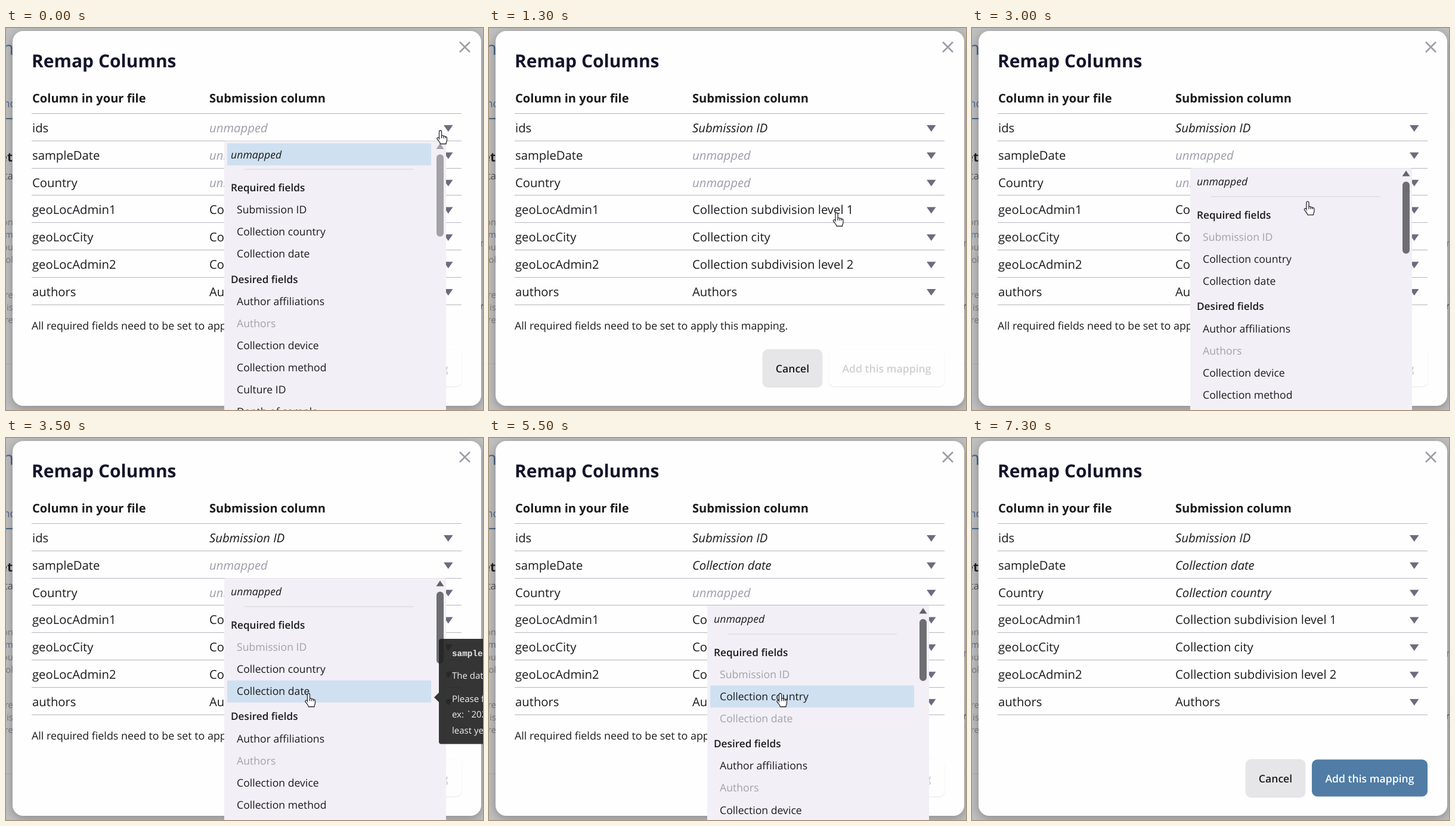
Animation, 800 px wide and 641 px high, one loop 7.4 s. Source, as an HTML page with a canvas:

```html
<!DOCTYPE html>
<html lang="en">
<head>
<meta charset="utf-8">
<title>Remap Columns</title>
<style>
  html, body { margin: 0; width: 100%; height: 100%; overflow: hidden; background: #c0c0c0; }
  canvas { display: block; }
</style>
</head>
<body>
<canvas id="stage" width="800" height="641"></canvas>
<script>
const ctx = document.getElementById('stage').getContext('2d');
ctx.textRendering = 'geometricPrecision';

const LOOP = 7400, STEP = 100, ROW = 45.83, ITEM = 37.1;
const SANS = '"Open Sans", "Noto Sans", sans-serif';
const INK = '#1b1b1e', MUTED = '#9d9dac', PANEL = '#f2f0f6', ACTIVE = '#cfe0f0';

const columns = [
  ['ids', 'Submission ID'],
  ['sampleDate', 'Collection date'],
  ['Country', 'Collection country'],
  ['geoLocAdmin1', 'Collection subdivision level 1'],
  ['geoLocCity', 'Collection city'],
  ['geoLocAdmin2', 'Collection subdivision level 2'],
  ['authors', 'Authors'],
];

// The first three columns are mapped by hand: menu opens, tooltip shows, entry is picked.
const choices = [
  { open: 0, tip: 600, pick: 1100, help: ['submissionId', ['Your sequence identifier']] },
  { open: 2200, tip: 3400, pick: 3800, help: ['sampleCollectionDate', ['The date of collection'],
      ['Please follow the format,', 'ex: `2024-05-01`, with at', 'least year given']] },
  { open: 4500, tip: 5700, pick: 5900, help: ['geoLocCountry', ['The country of collection']] },
];

const menu = [
  ['Required fields', 'Submission ID', 'Collection country', 'Collection date'],
  ['Desired fields', 'Author affiliations', 'Authors', 'Collection device',
    'Collection method', 'Culture ID', 'Depth of sample'],
];

// Pointer stops: time, x, y
const pointer = [
  [0, 720.5, 171.5], [200, 720, 173], [600, 578, 308], [1300, 575, 309.5], [1900, 585, 216],
  [2800, 585, 216], [3300, 499.5, 428], [3800, 499.5, 428], [4400, 476, 261],
  [5000, 476, 261], [5500, 480.5, 428], [6100, 480.5, 428], [6500, 500, 450],
];
const hand = new Path2D('M6 14V2.5a2 2 0 0 1 4 0V9.5a2 2 0 0 1 3.3 .7a2 2 0 0 1 3 .9' +
  'a1.8 1.8 0 0 1 2.7 1.6V17c0 2-1.5 3-1.5 6H8c-.4-3-3-5-5.5-8.5a1.8 1.8 0 0 1 2.8-2Z');

function text(str, x, y, size, color = INK, style = '400', family = SANS) {
  ctx.font = `${style} ${size}px ${family}`;
  ctx.fillStyle = color;
  ctx.fillText(str, x, y);
}

function centered(str, x, y, size, color, style) {
  ctx.textAlign = 'center';
  text(str, x, y, size, color, style);
  ctx.textAlign = 'left';
}

function box(x, y, w, h, r, color) {
  ctx.fillStyle = color;
  ctx.beginPath();
  ctx.roundRect(x, y, w, h, r);
  ctx.fill();
}

function shadowBox(x, y, w, h, r, color, blur, drop, shade) {
  ctx.save();
  ctx.shadowBlur = blur;
  ctx.shadowOffsetY = drop;
  ctx.shadowColor = shade;
  box(x, y, w, h, r, color);
  ctx.restore();
}

function polygon(color, ...points) {
  ctx.fillStyle = color;
  ctx.beginPath();
  points.forEach(p => ctx.lineTo(...p));
  ctx.fill();
}

function pointerAt(t) {
  const i = pointer.findIndex(p => p[0] > t);
  if (i < 0) return null;
  const [a, b] = [pointer[i - 1], pointer[i]];
  const k = (t - a[0]) / (b[0] - a[0]), s = k * k * (3 - 2 * k);
  return { x: a[1] + (b[1] - a[1]) * s, y: a[2] + (b[2] - a[2]) * s };
}

function drawPage() {
  ctx.fillStyle = '#c0c0c0';
  ctx.fillRect(0, 0, 800, 641);
  ctx.fillStyle = '#b0b0b2';
  for (const y of [154, 563]) ctx.fillRect(0, y, 800, 1);
  for (const y of [446, 485]) ctx.fillRect(796, y, 4, 1);
  ctx.fillStyle = '#4c698c';
  ctx.fillRect(0, 151, 12, 2);

  ctx.textAlign = 'right';
  text('n', 13, 45, 31, '#4c698c');
  text('nc', 15, 133, 18, '#4c698c');
  text('et', 11, 224, 21, '#222226', '700');
  text('ta', 12, 254, 17, '#55555c');
  ['on', 'rm', 'ou', 'ol'].forEach((s, i) =>
    text(s, 12, 331 + 21 * i, 15, i === 1 ? '#55708f' : '#7c7c82'));
  ['re', 'is', 're'].forEach((s, i) => text(s, 12, 453 + 21 * i, 15, '#7c7c82'));
  ctx.textAlign = 'left';
  text('n', 795, 367, 17, '#77777d');
  text('n', 795, 472, 15, '#333338');
}

function drawDialog(t) {
  shadowBox(11, 5, 786, 629, 18, '#fefefe', 18, 4, 'rgba(0,0,0,.3)');

  ctx.strokeStyle = '#9c9ca6';
  ctx.lineWidth = 2.5;
  ctx.beginPath();
  for (const s of [-1, 1]) {
    ctx.moveTo(769.5 - 8.5 * s, 23.5);
    ctx.lineTo(769.5 + 8.5 * s, 40.5);
  }
  ctx.stroke();

  text('Remap Columns', 43, 66, 30, '#14142b', '700');
  text('Column in your file', 44, 125, 20.1, INK, '700');
  text('Submission column', 341, 125, 20.1, INK, '700');

  for (let i = 0; i <= columns.length; i++) {
    ctx.fillStyle = '#b5b5bf';
    ctx.fillRect(43, Math.round(143 + ROW * i), 721, 1);
  }
  columns.forEach(([name, field], i) => {
    const y = 175 + ROW * i, choice = choices[i];
    const mapped = !choice || t >= choice.pick;
    text(name, 44, y, 20.3);
    text(mapped ? field : 'unmapped', 341, y, 20.3, mapped ? INK : MUTED,
      choice ? 'italic 400' : '400');
    polygon('#6b6c7e', [734, y - 12], [749.5, y - 12], [741.75, y - 1]);
  });

  const done = choices[2].pick;
  if (t < done) text('All required fields need to be set to apply this mapping.', 43, 506, 17.85);

  shadowBox(459, 539, 100, 63, 9, '#e6e6e9', 2, 1, 'rgba(0,0,0,.15)');
  centered('Cancel', 509, 578, 17.6, INK, '600');

  const ready = Math.min(1, Math.max(0, (t - done + 40) / 300));
  shadowBox(570, 539.5, 194, 62, 9, '#fefefe', 2, 1, 'rgba(0,0,0,.1)');
  ctx.globalAlpha = ready;
  box(570, 539.5, 194, 62, 9, '#507ca5');
  ctx.globalAlpha = 1;
  const grey = 207 + 48 * ready;
  centered('Add this mapping', 667, 578, 17.6, `rgb(${grey},${grey},${grey + 1})`, '600');
}

function drawMenu(row, t, tip) {
  const shift = ROW * row, top = 189.5 + shift;
  const inside = tip.y > top && tip.x > 366 && tip.x < 738;
  const taken = columns.filter((c, i) => !choices[i] || t >= choices[i].pick).map(c => c[1]);

  const highlight = center => box(371, center - 18.5, 342, 37, 1, ACTIVE);
  const under = center => inside && Math.abs(tip.y - center) < ITEM / 2;

  box(366, top, 372, 641, 2, PANEL);
  const first = 212 + shift;
  if (!inside || under(first)) highlight(first);
  text('unmapped', 377, first + 6.5, 17.7, INK, 'italic 400');
  ctx.fillStyle = '#e3e1e4';
  ctx.fillRect(400, Math.round(236 + shift), 284, 2);

  menu.forEach(([title, ...fields], g) => {
    const head = 268 + 153.6 * g + shift;
    text(title, 377, head + 6, 17.2, INK, '600');
    fields.forEach((field, i) => {
      const center = head + ITEM * (i + 1), disabled = taken.includes(field);
      if (under(center) && !disabled) highlight(center);
      text(field, 387, center + 6, 17.65, disabled ? '#a2a1aa' : INK);
    });
  });

  polygon(inside ? '#636366' : '#a2a1a6',
    [721.5, 203 + shift], [734.5, 203 + shift], [728, 193.5 + shift]);
  box(722, 212 + shift, 12, 138 - 17 * row, 6, inside ? '#6e6e72' : '#a2a1a6');
}

function drawTooltip([title, ...paragraphs], center) {
  const lines = [];
  let y = 29;
  for (const paragraph of paragraphs) {
    paragraph.forEach((str, i) => lines.push([str, y += i ? 26.5 : 38.5]));
  }
  const height = y + 17.5, top = center - height / 2;
  ctx.globalAlpha = 0.91;
  box(726, top, 240, height, 4, '#222');
  polygon('#222', [726, center + 2], [718, center + 10], [726, center + 18]);
  ctx.globalAlpha = 1;
  text(title, 748, top + 29, 14.3, '#e8e8e8', '700', '"Liberation Mono", monospace');
  lines.forEach(([str, dy]) => text(str, 748, top + dy, 15, '#f0f0f0'));
}

function drawPointer({ x, y }) {
  ctx.save();
  ctx.translate(x, y);
  ctx.fillStyle = '#fff';
  ctx.fill(hand);
  ctx.strokeStyle = '#2b2b35';
  ctx.lineWidth = 1.3;
  ctx.stroke(hand);
  ctx.beginPath();
  for (const k of [10, 13.2, 16.2]) {
    ctx.moveTo(k, 10 + (k - 10) / 5);
    ctx.lineTo(k, 13.5);
  }
  ctx.stroke();
  ctx.restore();
}

function draw(t) {
  const hover = pointerAt(t);
  drawPage();
  drawDialog(t);
  const row = choices.findIndex(c => t >= c.open && t < c.pick);
  if (row >= 0) {
    drawMenu(row, t, { x: hover.x + 8, y: hover.y + 1 });
    const position = menu[0].indexOf(columns[row][1]);
    if (t >= choices[row].tip) {
      drawTooltip(choices[row].help, 268 + ROW * row + ITEM * position);
    }
  }
  if (hover) drawPointer(hover);
}

const start = performance.now();
function frame() {
  const t = (performance.now() - start) % LOOP;
  draw(Math.floor(t / STEP) * STEP);
  requestAnimationFrame(frame);
}
frame();
</script>
</body>
</html>
```
